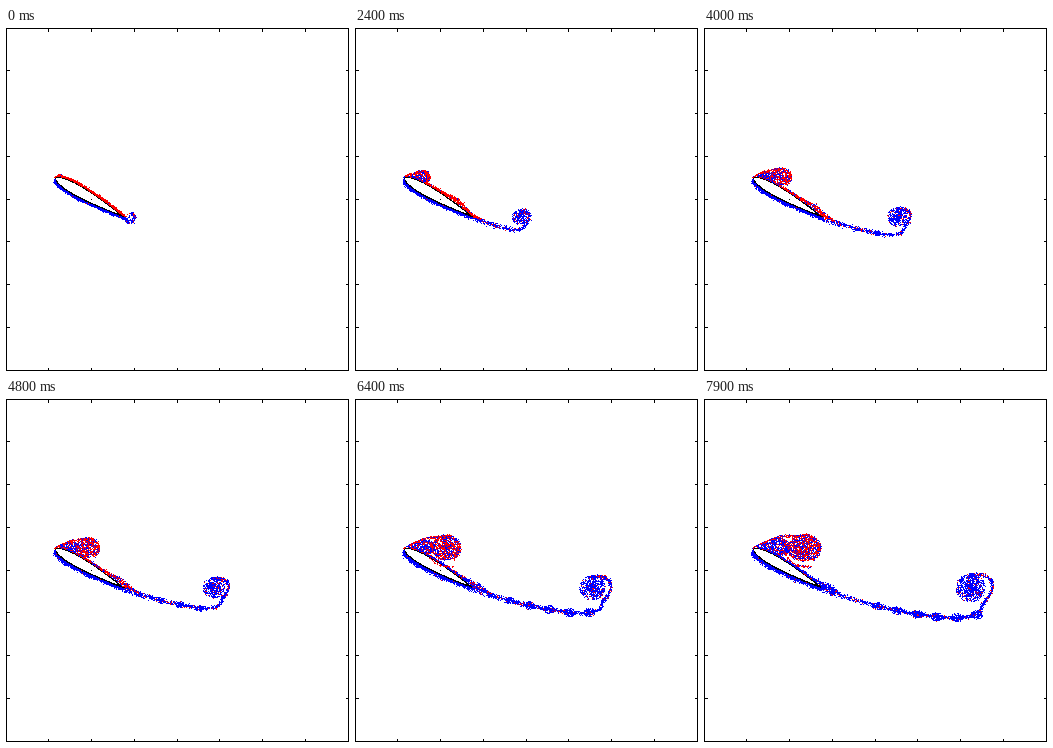
Write a matplotlib script that moves like this. It is 343x343 px and loops after 8000 ms.

```python
import numpy as np
import matplotlib.pyplot as plt
from matplotlib.animation import FuncAnimation

SIZE, DPI = 343, 100
FRAMES, STEP = 80, 100
RED, BLUE, BLACK = (255, 0, 0), (0, 0, 255), (0, 0, 0)
rng = np.random.default_rng(12)


def spline(points, n=500):
    """Catmull-Rom curve through the points."""
    p = np.asarray(points, float)
    q = np.vstack([2 * p[0] - p[1], p, 2 * p[-1] - p[-2]])
    s = np.linspace(0, len(p) - 1, n)
    i = np.minimum(s.astype(int), len(p) - 2)
    f = (s - i)[:, None]
    a, b, c, d = q[i], q[i + 1], q[i + 2], q[i + 3]
    return b + f / 2 * (c - a + f * (2 * a - 5 * b + 4 * c - d
                                     + f * (3 * (b - c) + d - a)))


def trace(points, u):
    """Positions and left-hand normals at arc-length fractions u, and the length."""
    line = spline(points)
    step = np.diff(line, axis=0)
    s = np.r_[0, np.cumsum(np.hypot(*step.T))]
    at = u * s[-1]
    pos = np.c_[np.interp(at, s, line[:, 0]), np.interp(at, s, line[:, 1])]
    k = np.clip(np.searchsorted(s, at) - 1, 0, len(step) - 1)
    d = step[k] / (np.hypot(*step[k].T)[:, None] + 1e-9)
    return pos, np.c_[d[:, 1], -d[:, 0]], s[-1]


def settle(t, tau):
    return 1 - np.exp(-t / tau)


# Wing section
NOSE, TAIL = np.array([49.0, 150.0]), np.array([118.0, 189.0])
CHORD = np.hypot(*(TAIL - NOSE))
AXIS = (TAIL - NOSE) / CHORD
UP = np.array([AXIS[1], -AXIS[0]])


def wing(c, side, grow=0.0):
    half = 0.72 * CHORD * (0.2969 * np.sqrt(c) - 0.126 * c - 0.3516 * c**2
                           + 0.2843 * c**3 - 0.1036 * c**4)
    return NOSE + np.outer(c * CHORD, AXIS) + np.outer(side * (half + grow), UP)


GRID = np.linspace(0, 1, 600) ** 2
ROOF = wing(GRID, 1)


def above_wing(p):
    """Keep points between the upper skin and the nose shear layer."""
    x, y = p.T
    floor = np.interp(x, ROOF[:, 0], ROOF[:, 1], right=250) - 1
    ceil = 150 - 0.95 * np.maximum(x - 47, 0) ** 0.8
    return np.c_[np.maximum(x, 48), np.minimum(np.maximum(y, ceil), floor)]


def wake_y(x):
    s = np.clip((x - TAIL[0]) / 134, 0, 1)
    return 189.5 + 28.5 * (1 - (1 - s) ** 1.71)


# Arm wound round the starting vortex at full size
ARM = np.array([(-16, 30), (6, 27), (12, 17), (20, 5), (21, -6), (12, -13), (-2, -13)])
# Thin streak under the front vortex, relative to its centre
STREAK = np.array([(-18, 4), (-14, 12), (-6, 17), (8, 19)])
SKIN_X = np.array([126, 135])
SKIN = np.vstack([wing(np.linspace(0.03, 0.98, 12), 1), np.c_[SKIN_X, wake_y(SKIN_X)]])


class Seeds:
    """Fixed random traits for one group of particles."""

    def __init__(self, n):
        self.u, self.v, self.tint = rng.random((3, n))
        self.g = rng.normal(size=n)


sheet, core, skin, belly = Seeds(1900), Seeds(900), Seeds(900), Seeds(900)
shear, front, second, streak = Seeds(800), Seeds(1300), Seeds(850), Seeds(100)
knots = [Seeds(130) for _ in range(6)]


def put(img, p, color):
    x, y = np.clip(np.rint(p), 1, SIZE - 2).astype(int).T
    img[y, x] = color


def paint(img, p, seeds, red, n=None):
    tone = np.where((seeds.tint < red)[:, None], RED, BLUE)
    put(img, p[:n], tone[:n])


def swirl(seeds, x, y, rx, ry, t, spin, power=0.5):
    rho = seeds.u ** power
    a = 2 * np.pi * seeds.v + spin * t / (0.35 + rho)
    return np.c_[x + rx * rho * np.cos(a), y + ry * rho * np.sin(a)]


def backdrop():
    img = np.full((SIZE, SIZE, 3), 255, np.uint8)
    for side, grow in ((1, 0), (-1, 0), (-1, -0.8)):
        put(img, wing(GRID, side, grow), BLACK)
    img[171, 85] = BLACK
    for k in (np.arange(1, 8) * 42.75 + 0.1).astype(int):
        img[k, :4] = img[k, -3:] = img[:4, k] = img[-3:, k] = 0
    img[0] = img[-1] = img[:, 0] = img[:, -1] = 0
    return img


def wake_line(t, cx, cy):
    arm = ARM * (0.2 + 0.101 * t) + (cx, cy)
    f = np.linspace(0, 1, 9)[:-1]
    x = TAIL[0] + f * (arm[0, 0] - TAIL[0])
    y = wake_y(x) + f**2 * (arm[0, 1] - wake_y(arm[0, 0]))
    return np.vstack([np.c_[x, y], arm])


def draw_wake(img, t):
    cx, cy = 124.5 + 16.2 * t + 0.22 * t**2, 188.4
    pts = wake_line(t, cx, cy)
    p, normal, length = trace(pts, sheet.u)
    near = np.exp(-np.abs(p[:, 0] - TAIL[0] - 8) / 25) * min(t / 4, 1)
    p = p + normal * (sheet.g * (0.9 + 0.8 * near))[:, None]
    paint(img, p, sheet, np.where(sheet.u > 0.8, 0.25, 0.15), int(6 * length))

    rise = spline(pts)
    rise = rise[:np.argmax(rise[:, 0])]
    for k, s in enumerate(knots):
        age = t - 1.85 - 0.78 * k
        if age > 0:
            x = TAIL[0] + 25.5 * age
            y = np.interp(x, rise[:, 0], rise[:, 1])
            r = 6 * settle(age, 0.9) * min(t / 6, 1)
            paint(img, swirl(s, x, y, r, 0.75 * r, t, -1, 0.6), s, 0.08, int(3.6 * r * r))

    r = 5 + 1.25 * t
    p = swirl(core, cx, cy, r, 0.95 * r, t, -1.5, 0.7)
    paint(img, p, core, 0.13, int(min(r - 4, 3.8) * r * r))


def draw_skin(img, t):
    c = (belly.u + 0.03 * t) % 1
    p = wing(c**1.3, -1, 0.3 + np.abs(belly.g) * (0.9 + 0.08 * t))
    paint(img, p, belly, 0.02)

    bump = 70 + 55 * settle(t, 3)
    height = 0.5 + 5 * settle(t, 2)
    red = 1 / (1 + np.exp((t - 5.5) / 1.2))
    p, normal, _ = trace(SKIN, skin.u * min(1, 0.82 + 0.03 * t))
    hump = height * np.exp(-((p[:, 0] - bump) / 11) ** 2)
    p = p + normal * (0.5 + np.abs(skin.g) * 0.8 + hump * skin.v)[:, None]
    paint(img, p, skin, red)


def draw_bubble(img, t):
    fx, fy, frx, fry = 52.5 + 5.9 * t, 148.7, 4 + 1.6 * t, min(2 + 1.6 * t, 13)
    sx, sy, srx, sry = 52 + 2.4 * t, 149 - 0.2 * t, 2 + 1.6 * t, 1 + 1.1 * t
    for s, x, y, rx, ry, red in ((second, sx, sy, srx, sry, 0.3),
                                 (front, fx, fy, frx, fry, 0.55)):
        p = above_wing(swirl(s, x, y, rx, ry, t, 1.2))
        paint(img, p, s, red, int(5.5 * rx * ry))

    a = np.radians(np.linspace(-115, 60, 6))
    rim = np.c_[fx + frx * np.cos(a), fy + fry * np.sin(a)]
    roof = [(48, 152), (49.5, 147), (sx, sy - sry)]
    p, normal, length = trace(np.vstack([roof, rim]), shear.u)
    p = p + normal * (shear.g * 0.8)[:, None]
    paint(img, above_wing(p), shear, 0.9 - 0.04 * t, int(5 * length))

    if t > 5:
        p, normal, _ = trace(STREAK + (fx, fy), streak.u)
        p = p + normal * (streak.g * 0.6)[:, None]
        paint(img, p, streak, 0.75, int(34 * (t - 5)))


BASE = backdrop()


def frame(i):
    t = i * STEP / 1000
    img = BASE.copy()
    draw_wake(img, t)
    draw_skin(img, t)
    draw_bubble(img, t)
    view.set_data(img)
    return (view,)


fig = plt.figure(figsize=(SIZE / DPI, SIZE / DPI), dpi=DPI)
ax = fig.add_axes([0, 0, 1, 1])
ax.axis("off")
view = ax.imshow(BASE, interpolation="nearest", aspect="auto")
anim = FuncAnimation(fig, frame, frames=FRAMES, interval=STEP, repeat=True)
plt.show()
```
